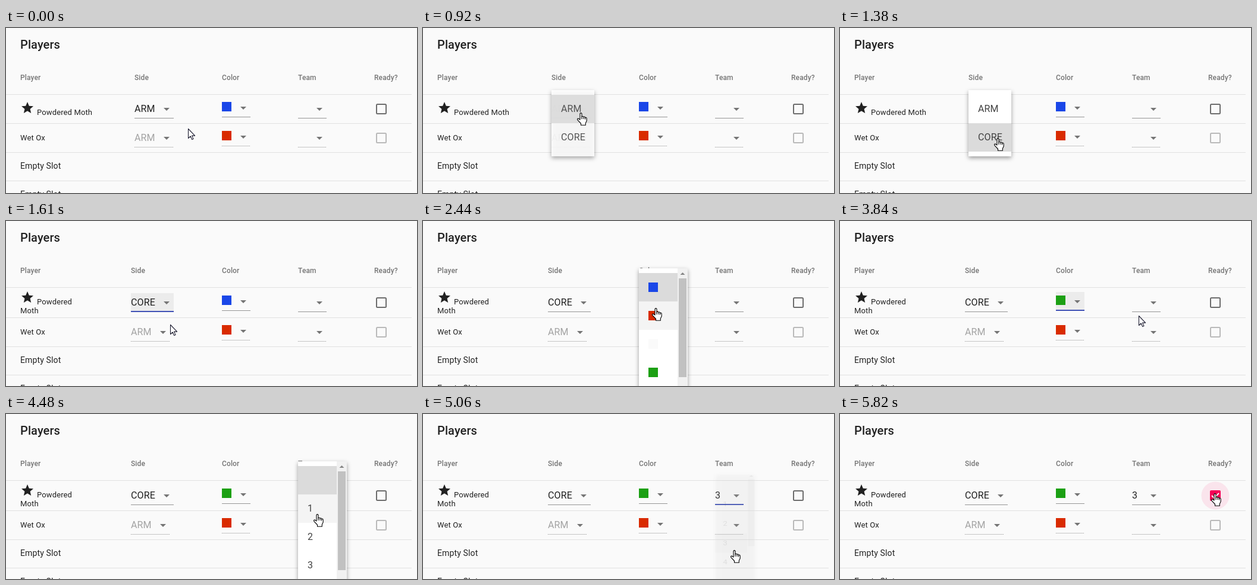
Write an HTML page with a canvas that moves like this. It is 691 by 279 pixels and loops after 6.91 s.

```html
<!DOCTYPE html>
<html lang="en">
<head>
<meta charset="utf-8">
<title>Players</title>
<style>
  html, body { margin: 0; width: 100%; height: 100%; overflow: hidden; background: #fafafa; }
  canvas { display: block; }
</style>
</head>
<body>
<canvas id="stage" width="691" height="279"></canvas>
<script>
const ctx = document.getElementById('stage').getContext('2d');
const LOOP = 6910;
const INK = '#212121', MUTED = '#757575', FAINT = '#a3a3a3', INDIGO = '#3f51b5';
const BLUE = '#1a47e8', RED = '#d92b00', GREEN = '#1ca014', PINK = '#f50057';
const RELAYOUT = 1470, CHECKED = 5670;

// Movement comes in bursts: first step, last step, number of steps.
const BURSTS = [
  [330, 570, 4], [750, 1380, 9], [1470, 2160, 11], [2240, 2240, 1], [2440, 2800, 6],
  [3150, 3370, 4], [3630, 4280, 10], [4400, 4780, 6], [4920, 5590, 11], [5680, 5820, 3]
];

// Time, x, y of the pointer tip.
const POINTER = [
  [0, 306, 170], [250, 306, 170], [570, 265, 143], [940, 265, 143], [1225, 265, 186],
  [1470, 265, 186], [1608, 276, 175], [1680, 280, 172], [1960, 391, 140], [2370, 391, 140],
  [2440, 391, 147], [2800, 391, 255], [3560, 391, 255], [3847, 502, 160], [3990, 523, 140],
  [4330, 523, 140], [4780, 523, 230], [5054, 523, 230], [5590, 630, 134], [LOOP, 630, 134]
];
const HAND_TIMES = [[480, 1500], [1940, 3600], [3980, 5080], [5450, LOOP]];

const SELECTS = {
  side: { x: 216, line: 152, focus: 560, open: 720, close: 1380, blur: 2015 },
  color: { x: 363, line: 150, focus: 2015, open: 2015, close: 3150, blur: 4055 },
  team: { x: 491, line: 152, focus: 4055, open: 4055, close: 4920, blur: 5580 }
};
const MENUS = [
  { ...SELECTS.side, top: 105, width: 72, height: 112, from: 66, items: ['ARM', 'CORE'], pick: 1 },
  { ...SELECTS.color, top: 80, width: 82, height: 300, from: 48, scroll: true,
    swatches: true, items: [BLUE, RED, '#fafafa', GREEN], pick: 3, hover: 1 },
  { ...SELECTS.team, top: 80, width: 82, height: 300, from: 48, scroll: true,
    items: ['', '1', '2', '3', '4', '5'], pick: 3 }
];

const STAR = new Path2D('M12 17.27L18.18 21l-1.64-7.03L22 9.24l-7.19-.61L12 2 9.19 8.63 2 9.24l5.46 4.73L5.82 21z');
const ARROW = new Path2D('M.5 .5V16.5L4.2 13 6.7 18.6 9 17.6 6.6 12.1H11.6Z');
const HAND = new Path2D('M5 1.8Q6.5-.6 8 1.8V7Q9.6 5.4 11 7.4Q12.6 6.2 13.6 8.4Q16.2 7.6 16.2 10.5V14L14.3 18V21.3H6.5V18.5L1 12.7Q-.2 10 2 10L5 12Z');
const KNUCKLES = new Path2D('M8 6.5V11M11 7.5V11M13.6 8.5V11.5');

const clamp = v => Math.max(0, Math.min(1, v));
const within = (t, [a, b]) => t >= a && t < b;

function rect(x, y, w, h, color) {
  ctx.fillStyle = color;
  ctx.fillRect(x, y, w, h);
}

function text(str, x, y, size, color = INK, weight = 400, spacing = .01) {
  ctx.font = `${weight} ${size}px Roboto, sans-serif`;
  ctx.letterSpacing = `${size * spacing}px`;
  ctx.fillStyle = color;
  ctx.fillText(str, x, y);
}

function triangle(x, y, half, height, color) {
  ctx.fillStyle = color;
  ctx.beginPath();
  ctx.moveTo(x - half, y);
  ctx.lineTo(x + half, y);
  ctx.lineTo(x, y + height);
  ctx.fill();
}

// Time of the latest visible step.
function heldTime(t) {
  let held = 0;
  for (const [start, end, count] of BURSTS) {
    if (t < start) break;
    const step = count > 1 ? (end - start) / (count - 1) : 1;
    held = start + Math.min(count - 1, Math.floor((t - start + 8) / step)) * step;
  }
  return held;
}

function pointerAt(t) {
  const i = Math.max(1, POINTER.findIndex(p => p[0] >= t));
  const [t0, x0, y0] = POINTER[i - 1], [t1, x1, y1] = POINTER[i];
  const k = (t - t0) / (t1 - t0);
  return { x: Math.round(x0 + (x1 - x0) * k), y: Math.round(y0 + (y1 - y0) * k) };
}

function drawSelect(t, select, x, width, line, draw) {
  const focused = within(t, [select.focus, select.blur]);
  if (focused && t >= select.close + 200) rect(x, line - 31, width, 30, '#ececec');
  if (focused) rect(x, line - 1, width, 2, INDIGO);
  else rect(x, line, width, 1, '#949494');
  triangle(x + width - 12, line - 17, 5, 5, MUTED);
  draw(x, line);
}

function drawDisabled(x, width, line) {
  ctx.strokeStyle = '#929292';
  ctx.lineWidth = 1;
  ctx.setLineDash([1, 1]);
  ctx.beginPath();
  ctx.moveTo(x, line + .5);
  ctx.lineTo(x + width, line + .5);
  ctx.stroke();
  ctx.setLineDash([]);
  triangle(x + width - 12, line - 17, 5, 5, MUTED);
}

function drawCheckbox(y, color) {
  ctx.strokeStyle = color;
  ctx.lineWidth = 2;
  ctx.beginPath();
  ctx.roundRect(623, y + 1, 16, 16, 1.5);
  ctx.stroke();
}

function drawReady(t, y) {
  if (t < CHECKED) return drawCheckbox(y, '#6c6c6c');
  const grow = clamp((t - 5600) / 200);
  ctx.fillStyle = 'rgba(245,0,87,.09)';
  ctx.beginPath();
  ctx.arc(631, y + 9, 23.5 * grow, 0, 7);
  ctx.fill();
  ctx.fillStyle = PINK;
  ctx.beginPath();
  ctx.roundRect(622, y, 18, 18, 2);
  ctx.fill();
  ctx.strokeStyle = '#fff';
  ctx.lineWidth = 2;
  ctx.beginPath();
  ctx.moveTo(625, y + 9);
  ctx.lineTo(629, y + 13);
  ctx.lineTo(637, y + 5);
  ctx.stroke();
}

function drawTable(t) {
  const moved = t >= RELAYOUT;
  const a = moved ? 1 : 0, b = moved ? 2 : 0;
  const sideX = moved ? 210 : 216;
  const { side, color, team } = SELECTS;

  text('Players', 24, 35, 20, INK, 500, .005);
  [['Player', 24], ['Side', sideX], ['Color', 363], ['Team', 491], ['Ready?', 619]]
    .forEach(([label, x]) => text(label, x, 88, 12, MUTED, 500));
  [112, 161 + b, 210 + b, 258 + b].forEach(y => rect(0, y, 682, 1, '#e1e1e1'));

  ctx.save();
  ctx.translate(24, moved ? 117 : 123);
  ctx.fillStyle = INK;
  ctx.fill(STAR);
  ctx.restore();
  if (moved) {
    text('Powdered', 52, 141, 13);
    text('Moth', 24, 156, 13);
  } else {
    text('Powdered Moth', 52, 147, 13);
  }
  text('Wet Ox', 24, 190 + b, 13);
  text('Empty Slot', 24, 238 + b, 14);
  text('Empty Slot', 24, 286 + b, 14);

  drawSelect(t, side, sideX, moved ? 72 : 66, side.line + a,
    (x, y) => text(moved ? 'CORE' : 'ARM', x, y - 10, 16));
  drawSelect(t, color, color.x, 48, color.line + a,
    (x, y) => rect(x, y - 25, 16, 16, t < color.close ? BLUE : GREEN));
  drawSelect(t, team, team.x, 48, team.line + a,
    (x, y) => t >= team.close && text('3', x, y - 10, 16));

  drawDisabled(sideX, 66, 201 + b);
  text('ARM', sideX, 191 + b, 16, FAINT);
  drawDisabled(363, 48, 199 + b);
  rect(363, 174 + b, 16, 16, RED);
  drawDisabled(491, 48, 201 + b);

  drawReady(t, 128 + a);
  drawCheckbox(177 + b, '#b9b9b9');
}

function drawMenu(t, menu, pointer) {
  const opening = clamp((t - menu.open) / 210);
  const closing = clamp((t - menu.close) / 150);
  const alpha = opening * (1 - closing);
  if (alpha <= 0) return;

  // Grows out of the closed field and shrinks back towards it.
  const shrink = (1 - opening) ** 3 + closing * .46;
  const sx = 1 - shrink * (1 - menu.from / menu.width);
  const sy = 1 - shrink * (1 - 48 / menu.height) * .93;
  const { x, top, width, height } = menu;
  const bodyWidth = menu.scroll ? 65 : width;

  ctx.save();
  ctx.globalAlpha = alpha;
  ctx.translate(x, 138);
  ctx.scale(sx, sy);
  ctx.translate(-x, -138);

  ctx.shadowColor = 'rgba(0,0,0,.38)';
  ctx.shadowBlur = 7;
  ctx.shadowOffsetY = 3;
  rect(x, top, width, height, '#fff');
  ctx.shadowColor = 'transparent';

  const hovered = menu.hover ?? Math.floor((pointer.y + 3 - top - 8) / 48);
  const selected = t >= menu.close ? menu.pick : 0;
  menu.items.forEach((item, i) => {
    const y = top + 8 + i * 48;
    if (i === selected) rect(x, y, bodyWidth, 48, '#dbdbdb');
    else if (i === hovered) rect(x, y, bodyWidth, 48, '#f4f4f4');
    if (menu.swatches) rect(x + 16, y + 16, 16, 16, item);
    else text(item, x + 16, y + 29, 16, '#424242');
  });

  if (menu.scroll) {
    rect(x + 65, top, 17, height, '#f1f1f1');
    rect(x + 67, 97, 13, 167, '#c1c1c1');
    triangle(x + 73.5, 91, 4, -4, '#858585');
  }
  ctx.restore();
}

function drawPointer(t, { x, y }) {
  const hand = HAND_TIMES.some(range => within(t, range));
  ctx.save();
  ctx.translate(hand ? x - 6 : x, y);
  ctx.fillStyle = '#fff';
  ctx.strokeStyle = hand ? '#000' : '#1c1c30';
  ctx.lineWidth = 1.1;
  ctx.lineJoin = 'round';
  ctx.fill(hand ? HAND : ARROW);
  ctx.stroke(hand ? HAND : ARROW);
  if (hand) ctx.stroke(KNUCKLES);
  ctx.restore();
}

function frame(now) {
  const t = heldTime(now % LOOP);
  const pointer = pointerAt(t);
  rect(0, 0, 691, 279, '#fafafa');
  drawTable(t);
  MENUS.forEach(menu => drawMenu(t, menu, pointer));
  drawPointer(t, pointer);
  requestAnimationFrame(frame);
}
requestAnimationFrame(frame);
</script>
</body>
</html>
```
